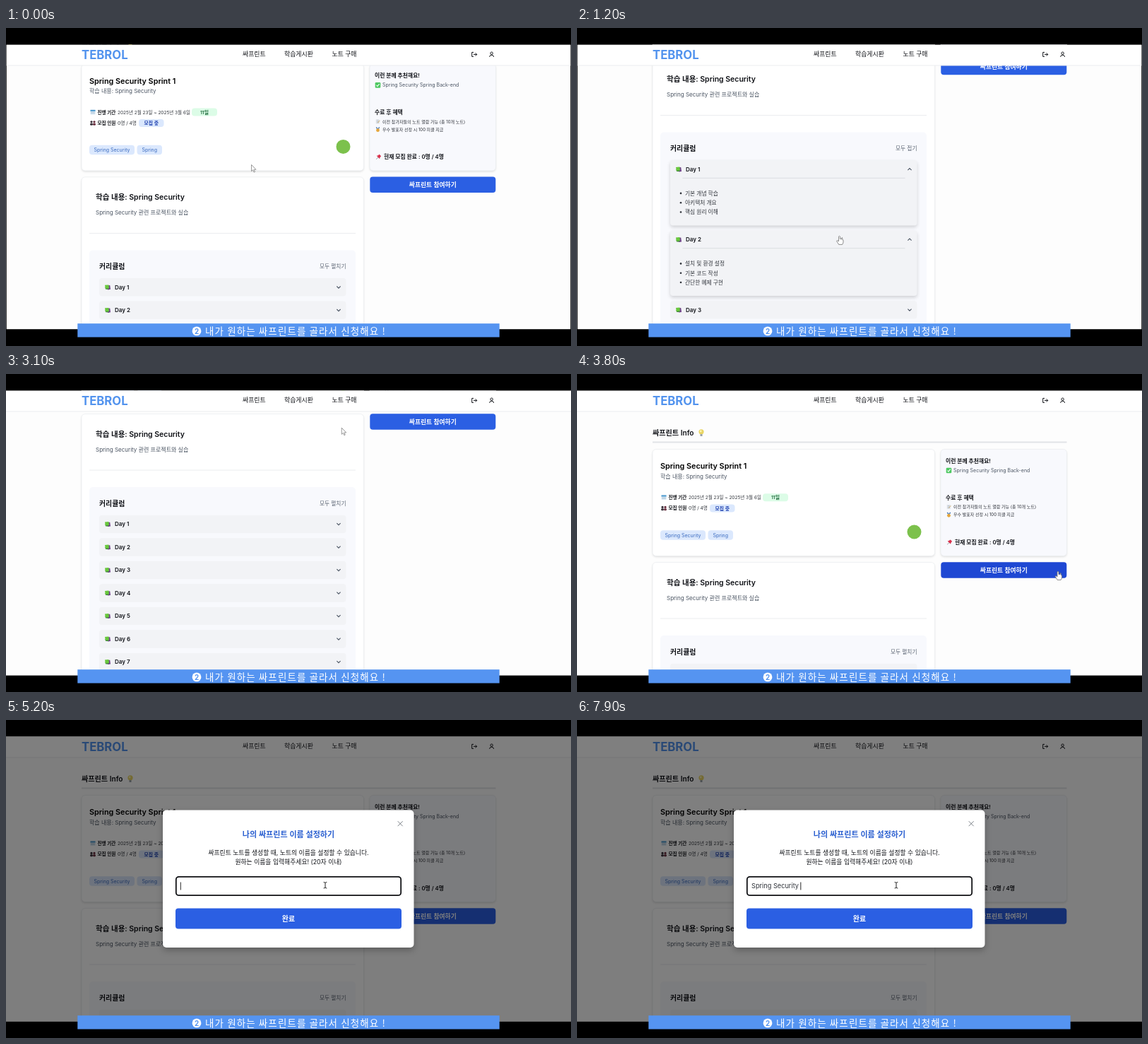
Write an HTML page with a canvas that moves like this. It is 800 px wide and 450 px high and loops after 8 s.

```html
<!DOCTYPE html>
<html lang="ko">
<head>
<meta charset="utf-8">
<title>Sprint sign-up</title>
<style>
html, body { margin: 0; width: 100%; height: 100%; overflow: hidden; background: #000; }
canvas { display: block; width: 800px; height: 450px; }
</style>
</head>
<body>
<canvas id="stage" width="800" height="450"></canvas>
<script>
const ctx = document.getElementById('stage').getContext('2d');
const LOOP = 8000, STEP = 100;
const SANS = 'Inter, "Noto Sans CJK KR", "Noto Sans CJK", sans-serif';
const KOREAN = '"Noto Sans CJK KR", "Noto Sans CJK", sans-serif';
const INK = '#111318', GRAY = '#4b5563', BLUE = '#2b5fe3', DEEP = '#1f48d3';

const LESSONS = [
  ['기본 개념 학습', '아키텍처 개요', '핵심 원리 이해'],
  ['설치 및 환경 설정', '기본 코드 작성', '간단한 예제 구현'],
  [],
  ['보안 및 최적화', '고급 기능 활용', '성능 테스트']
];
const DAYS = 11;

// time, scroll
const SCROLL = [[300, 55.6], [700, 222.5], [1200, 222.5], [1600, 324], [2900, 324], [3400, 0]];
// time, x, y of the pointer tip
const POINTER = [
  [300, 347.5, 193.5], [800, 372, 198], [900, 372, 198], [1100, 371.5, 294], [1200, 371.5, 294],
  [1700, 372, 325], [1900, 372, 325], [2200, 433.5, 101], [2300, 466, 67], [3000, 466, 67],
  [3800, 681, 279], [3900, 681, 279], [4200, 252, 276], [4300, 252, 276], [4500, 482, 317],
  [4700, 482, 317], [5000, 452, 234]
];
// time, pointer shape
const SHAPES = [[0, arrow], [700, hand], [1900, arrow], [2300, hand], [3000, arrow],
  [3700, hand], [3900, arrow], [4200, hand], [4900, beam]];

const clamp = v => Math.max(0, Math.min(1, v));
const ease = v => v * v * (3 - 2 * v);
const ramp = (t, a, b) => ease(clamp((t - a) / (b - a)));

function track(keys, t, n = 1) {
  if (t <= keys[0][0]) return keys[0][n];
  for (let i = 1; i < keys.length; i++) {
    const a = keys[i - 1], b = keys[i];
    if (t <= b[0]) return a[n] + (b[n] - a[n]) * ramp(t, a[0], b[0]);
  }
  return keys[keys.length - 1][n];
}

function rect(x, y, w, h, fill) {
  ctx.fillStyle = fill;
  ctx.fillRect(x, y, w, h);
}

function box(x0, y0, x1, y1, r, fill, stroke, width = 1) {
  ctx.beginPath();
  ctx.roundRect(x0, y0, x1 - x0, y1 - y0, r);
  if (fill) { ctx.fillStyle = fill; ctx.fill(); }
  if (stroke) { ctx.strokeStyle = stroke; ctx.lineWidth = width; ctx.stroke(); }
}

function raised(blur, drop, alpha, draw) {
  ctx.save();
  ctx.shadowColor = `rgba(0,0,0,${alpha})`;
  ctx.shadowBlur = blur;
  ctx.shadowOffsetY = drop;
  draw();
  ctx.restore();
}

function disc(x, y, r, fill) {
  ctx.beginPath();
  ctx.arc(x, y, r, 0, Math.PI * 2);
  ctx.fillStyle = fill;
  ctx.fill();
}

function line(points, color, width) {
  ctx.beginPath();
  points.forEach(([x, y], i) => i ? ctx.lineTo(x, y) : ctx.moveTo(x, y));
  ctx.strokeStyle = color;
  ctx.lineWidth = width;
  ctx.stroke();
}

function shape(d, x, y, fill, stroke, width) {
  ctx.save();
  ctx.translate(x, y);
  const path = new Path2D(d);
  if (fill) { ctx.fillStyle = fill; ctx.fill(path); }
  if (stroke) { ctx.strokeStyle = stroke; ctx.lineWidth = width; ctx.stroke(path); }
  ctx.restore();
}

// y is the optical middle of the line
function text(str, x, y, size, color = INK, weight = 400, align = 'left') {
  ctx.font = `${weight} ${size}px ${SANS}`;
  ctx.textAlign = align;
  ctx.fillStyle = color;
  ctx.fillText(str, x, y + size * 0.37);
  return ctx.measureText(str).width;
}

function pill(str, x0, x1, y, h, r, fill, color, size, weight) {
  box(x0, y - h / 2, x1, y + h / 2, r, fill);
  text(str, (x0 + x1) / 2, y, size, color, weight, 'center');
}

function button(str, x0, y0, x1, y1, size, fill) {
  box(x0, y0, x1, y1, 4, fill);
  text(str, (x0 + x1) / 2, (y0 + y1) / 2, size, '#fff', 600, 'center');
}

// Small pictograms, centred on x, y
const icon = {
  calendar(x, y) {
    box(x - 3.5, y - 3.5, x + 3.5, y + 3.5, 1, '#d7e6f2');
    rect(x - 3.5, y - 3, 7, 2, '#4d9bd0');
    for (let i = 0; i < 3; i++) rect(x - 2.4 + i * 1.9, y + 0.6, 1, 1, '#7f9db5');
  },
  people(x, y) {
    for (const [dx, c] of [[-2, '#39313b'], [2, '#6a3040']]) {
      disc(x + dx, y - 1.6, 1.6, c);
      box(x + dx - 1.9, y + 0.3, x + dx + 1.9, y + 3.3, 1.3, c);
    }
  },
  check(x, y) {
    box(x - 3.8, y - 3.8, x + 3.8, y + 3.8, 1.2, '#4fc963');
    line([[x - 2, y], [x - 0.6, y + 1.6], [x + 2.2, y - 1.8]], '#fff', 1.1);
  },
  memo(x, y) {
    box(x - 2.8, y - 3.2, x + 2.4, y + 3.2, 0.5, '#e3e7ec');
    for (let i = 0; i < 3; i++) rect(x - 1.8, y - 1.8 + i * 1.6, 3, 0.5, '#9ba5b0');
    line([[x, y + 1.6], [x + 2.8, y - 1.6]], '#c9a35c', 0.9);
  },
  medal(x, y) {
    line([[x - 2.2, y - 3.3], [x, y], [x + 2.2, y - 3.3]], '#4f7fb8', 1.5);
    disc(x, y + 1.1, 2.4, '#e5a63a');
  },
  pin(x, y) {
    line([[x - 3.3, y + 3.3], [x, y]], '#8b929c', 0.9);
    shape('M-2.8-1.6L1.6 2.8L1.9 1L3.6-1.2L1.2-3.6L-1-1.9Z', x, y, '#d9304c');
  },
  books(x, y) {
    shape('M-1-2.4L3.2-2.8L4 3L0 3.6Z', x, y, '#70408a');
    shape('M-3.8 0L1 1L1.4 3L-2.8 3Z', x, y, '#3d7f3a');
    shape('M-4-3L1.4-3.4L2 1.6L-3.2 2Z', x, y, '#68c83c');
  },
  bulb(x, y) {
    disc(x, y - 1.2, 3.6, '#e9d565');
    disc(x - 0.8, y - 2, 1.4, '#fbf3b4');
    box(x - 1.5, y + 2, x + 1.5, y + 5, 0.6, '#9aa2a8');
  },
  warning(x, y) {
    shape('M0-4L4.6 4H-4.6Z', x, y, '#f0b429', '#e0903a', 0.8);
    rect(x - 0.5, y - 1.4, 1, 2.8, '#3a2a10');
    rect(x - 0.5, y + 2, 1, 1, '#3a2a10');
  }
};

function arrow(x, y) {
  shape('M0 0V9.2L2.1 7.3L3.6 10.6L5 10L3.6 6.8H6.5Z', x, y, '#fff', '#808080', 0.8);
}

function hand(x, y) {
  shape('M-1 1Q0-0.4 1 1V4.6Q2.2 4 2.8 5Q4-0.4 4.4 5.6Q5.6 5.4 5.5 7V9Q5.2 11 4.2 12.4H-0.9' +
    'Q-2 10-3.8 7.8Q-3.6 6-2 7L-1 8Z', x, y, '#fff', '#707070', 0.8);
}

function beam(x, y) {
  shape('M-2.3-4.5Q0-4.5 0-3.3Q0-4.5 2.3-4.5M0-3.5V3M-2.3 4Q0 4 0 2.8Q0 4 2.3 4', x, y, null, '#222', 1);
}

function header(left, right, top) {
  rect(left, top, right - left, 53 - top, '#fff');
  rect(left, 52.5, right - left, 1, '#eceef0');
  text('TEBROL', 107, 37.7, 16.7, '#5293ee', 700);
  text('싸프린트', 335, 37.2, 8.9, INK, 500);
  text('학습게시판', 394, 37.2, 8.9, INK, 500);
  text('노트 구매', 461.5, 37.2, 8.9, INK, 500);
  shape('M-1-3H-3.3V3H-1M-1 0H3.6M1.7-2L3.7 0L1.7 2', 663, 37.4, null, INK, 1);
  shape('M1.7-1.7A1.7 1.7 0 1 1-1.7-1.7A1.7 1.7 0 1 1 1.7-1.7M-3 3.5Q-2.8 0.9 0 0.9Q2.8 0.9 3 3.5',
    687.6, 37.4, null, INK, 1);
}

function card(x0, y0, x1, y1, fill) {
  raised(3, 1.5, 0.12, () => box(x0, y0, x1, y1, 5, fill));
  box(x0, y0, x1, y1, 5, null, '#eaecef', 0.7);
}

function summary() {
  text('싸프린트 Info', 107, 83, 10.1, INK, 600);
  icon.bulb(176, 83);
  rect(107, 95.5, 586.5, 2, '#e1e3e7');

  card(107, 106.5, 506.5, 257.5, '#fff');
  text('Spring Security Sprint 1', 118, 130.5, 10.8, '#000', 600);
  text('학습 내용: Spring Security', 118, 145, 8, GRAY);
  icon.calendar(123, 174.5);
  text('진행 기간', 129.5, 174.7, 6.6, INK, 600);
  text('2025년 2월 23일 ~ 2025년 3월 6일', 158, 174.7, 6.5, '#30343b');
  pill('11일', 263, 299, 174.7, 11, 4, '#dcfce7', '#166534', 6.8, 600);
  icon.people(123, 190);
  text('모집 인원', 129.5, 190, 6.6, INK, 600);
  text('0명 / 4명', 158, 190, 6.7, '#30343b');
  pill('모집 중', 188, 223.5, 190, 11, 4, '#dbe8fd', '#1e40af', 6.8, 600);
  pill('Spring Security', 118, 182, 228, 13.5, 4, '#dbe8fd', '#3c6cc0', 7, 400);
  pill('Spring', 185.5, 221, 228, 13.5, 4, '#dbe8fd', '#3c6cc0', 7, 400);
  disc(477.5, 223.5, 10, '#7cc14c');
}

function sidebar(hover) {
  card(515, 106.5, 693.5, 257.5, '#f8f9fd');
  text('이런 분께 추천해요!', 522, 123, 7.8, INK, 600);
  icon.check(526.5, 136.5);
  text('Spring Security Spring Back-end', 533, 136.5, 7, GRAY);
  text('수료 후 혜택', 522, 175, 7.8, INK, 600);
  icon.memo(526.5, 188);
  text('이전 참가자들의 노트 열람 가능 (총 10개 노트)', 533, 188, 6.05, '#30343b');
  icon.medal(526.5, 199.2);
  text('우수 발표자 선정 시 100 피클 지급', 533, 199.2, 6, '#30343b');
  icon.pin(527.5, 238);
  text('현재 모집 완료 : 0명 / 4명', 535, 238, 7.8, INK, 600);
  button('싸프린트 참여하기', 515.3, 266.2, 693.3, 288.7, 8.8, hover ? DEEP : BLUE);
}

function day(i, y, open) {
  const bottom = y + 12.7 + 67 * open;
  const body = () => box(132, y - 12.7, 481.5, bottom, 4, '#f2f3f6');
  if (open > 0) raised(5, 2.5, 0.16 * open, body); else body();
  icon.books(144, y);
  text('Day ' + (i + 1), 154, y, 8, INK, 600);
  const d = open > 0.5 ? -1.3 : 1.3;
  line([[468.4, y - d], [471, y + d], [473.6, y - d]], '#4b5563', 1.1);
  if (open <= 0) return;
  ctx.save();
  ctx.beginPath();
  ctx.rect(132, y - 12.7, 350, bottom - y + 12.7);
  ctx.clip();
  rect(149.5, y + 12, 315, 0.8, '#d6d9dd');
  LESSONS[i].forEach((str, n) => {
    const ly = y + 34 + n * 13.3;
    disc(147, ly, 1.3, '#30343b');
    text(str, 153, ly, 7.7, '#30343b');
  });
  ctx.restore();
}

function opened(i, t) {
  const starts = [800, 1000, Infinity, 1700];
  const start = starts[i] ?? Infinity;
  if (t < start) return 0;
  return ramp(t, start - 50, start + 150) * (1 - ramp(t, 2200, 2400));
}

function curriculum(t) {
  const state = Array.from({ length: DAYS }, (_, i) => opened(i, t));
  const total = state.reduce((sum, o) => sum + 32.5 + 67 * o, 0);
  const end = 409.8 + total + 6;
  card(107, 266.5, 506.5, end + 12, '#fff');
  text('학습 내용: Spring Security', 127, 295, 10.5, INK, 600);
  text('Spring Security 관련 프로젝트와 실습', 127, 317, 8, GRAY);
  rect(118, 345.6, 377, 0.8, '#e6e8eb');
  box(118, 370, 495, end, 5, '#f8f9fd');
  text('커리큘럼', 132, 393, 9.9, INK, 600);
  text(state.some(o => o > 0) ? '모두 접기' : '모두 펼치기', 481.5, 393, 7.7, '#5b6472', 400, 'right');
  let y = 422.4;
  state.forEach((o, i) => {
    day(i, y, o);
    y += 32.5 + 67 * o;
  });
}

function panel(top, bottom, title) {
  raised(10, 4, 0.25, () => box(222, top, 577.5, bottom, 5, '#fff'));
  const y = top + 19.2;
  line([[554.7, y - 3.5], [561.7, y + 3.5]], '#70757d', 0.9);
  line([[561.7, y - 3.5], [554.7, y + 3.5]], '#70757d', 0.9);
  text(title, 400, top + 34.3, 11.05, '#2a5fd0', 600, 'center');
}

function confirmPanel(t) {
  const agreed = t >= 4300;
  panel(101.5, 348.5, '싸프린트 참여 신청 확인');
  icon.warning(248.5, 166);
  text('싸프린트 신청은 취소가 불가능합니다. 아래 내용을 확인하고 신중히 결정해주세요!', 257, 166, 8.83);
  box(240, 186, 560, 253, 4, '#e5edfc');
  ['싸프린트 신청 후에는 취소 및 변경이 불가능합니다.',
    '싸프린트 기간 동안 적극적인 참여를 권장합니다.',
    '참여 후 제공되는 혜택은 수료 조건을 충족한 경우에만 받을 수 있습니다.'
  ].forEach((str, i) => {
    const y = 206 + i * 13.3;
    disc(255, y, 1.4, '#30343b');
    text(str, 265, y, 8.8, '#30343b');
  });
  if (agreed) {
    box(246.5, 271.7, 257.7, 282.9, 1.6, '#2b6fe6');
    line([[249, 277.4], [251.3, 279.8], [255.4, 274.6]], '#fff', 1.5);
  } else {
    box(247, 272.2, 257.2, 282.4, 1.6, '#fff', '#767676', 1);
  }
  text('위 내용을 확인하였으며, 신청에 동의합니다.', 262, 277, 8.8);
  button('싸프린트 참여하기', 240, 297.3, 560, 326, 9.95, !agreed ? '#a3a8b3' : t >= 4400 ? DEEP : BLUE);
}

function typed(t) {
  const full = 'Spring Security ';
  if (t < 6200) return full.slice(0, Math.max(0, Math.min(8, (t - 5200) / 100)));
  if (t < 6300) return full.slice(0, 8);
  return full.slice(0, 9 + Math.max(0, Math.floor((t - 6400) / 100)));
}

function namePanel(t) {
  panel(127.5, 322, '나의 싸프린트 이름 설정하기');
  text('싸프린트 노트를 생성할 때, 노트의 이름을 설정할 수 있습니다.', 400, 187.5, 8.8, INK, 400, 'center');
  text('원하는 이름을 입력해주세요! (20자 이내)', 400, 201, 8.8, INK, 400, 'center');
  const focus = t >= 5200;
  box(240.8, 221.8, 559.2, 248.2, 4, '#fff', focus ? '#101114' : '#cfd4dc', focus ? 1.8 : 0.9);
  const width = text(typed(t), 247, 235, 9.2, '#30343b');
  const blink = (t >= 7400 && t < 7600) || (t >= 7800 && t < 7900);
  if (focus && !blink) rect(246.8 + width, 229.5, 0.9, 11, '#111');
  button('완료', 240, 266.6, 560, 295.5, 9.95, BLUE);
}

function capsNotice(t) {
  ctx.save();
  ctx.shadowColor = 'rgba(0,0,0,0.55)';
  ctx.shadowBlur = 3;
  ctx.shadowOffsetX = ctx.shadowOffsetY = 4;
  rect(378, 374, 44.5, 31, '#f3f3f3');
  ctx.restore();
  line([[394, 388.5], [398, 380], [400.5, 388.5]], '#111', 1.1);
  line([[395.5, 386], [404, 386]], '#111', 0.9);
  line([[399, 388.5], [403, 380], [405.5, 388.5]], '#111', 1.1);
  line([[395, 389], [406, 379]], '#111', 0.9);
  text('Caps Lock ' + (t < 6200 ? '설정' : '해제'), 400, 393, 4, '#333', 400, 'center');
}

function caption() {
  rect(101.3, 418.2, 597.4, 19.3, '#5594f1');
  disc(270, 428.9, 6.4, '#fff');
  text('2', 270, 428.9, 9.8, '#5594f1', 700, 'center');
  ctx.font = `300 13.5px ${KOREAN}`;
  ctx.textAlign = 'left';
  ctx.fillStyle = '#fff';
  ctx.letterSpacing = '1.1px';
  ctx.fillText('내가 원하는 싸프린트를 골라서 신청해요 !', 282, 433.7);
  ctx.letterSpacing = '0px';
}

function draw(t) {
  const late = t >= 3000;
  const [left, right, top, bottom] = late ? [0, 800, 23.4, 426.8] : [0.5, 799.5, 23.6, 426.4];
  rect(0, 0, 800, 450, '#000');
  ctx.save();
  ctx.beginPath();
  ctx.rect(left, top, right - left, bottom - top);
  ctx.clip();
  rect(left, top, right - left, bottom - top, '#fdfdfd');
  ctx.save();
  ctx.translate(0, -track(SCROLL, t));
  summary();
  sidebar(t >= 3700 && t < 3900);
  curriculum(t);
  ctx.restore();
  header(left, right, top);

  if (t >= 3900) {
    const fade = clamp((t - 3800) / 200);
    rect(left, top, right - left, bottom - top, `rgba(0,0,0,${0.5 * fade})`);
    ctx.globalAlpha = fade;
    if (t < 4700) confirmPanel(t); else namePanel(t);
    ctx.globalAlpha = 1;
    if (t >= 5900 && t < 6500) capsNotice(t);
  }
  const pointer = SHAPES.filter(s => s[0] <= t).pop()[1];
  pointer(track(POINTER, t), track(POINTER, t, 2));
  ctx.restore();
  caption();
}

const begin = performance.now();
function frame() {
  const t = (performance.now() - begin) % LOOP;
  draw(Math.floor(t / STEP) * STEP);
  requestAnimationFrame(frame);
}
frame();
</script>
</body>
</html>
```
